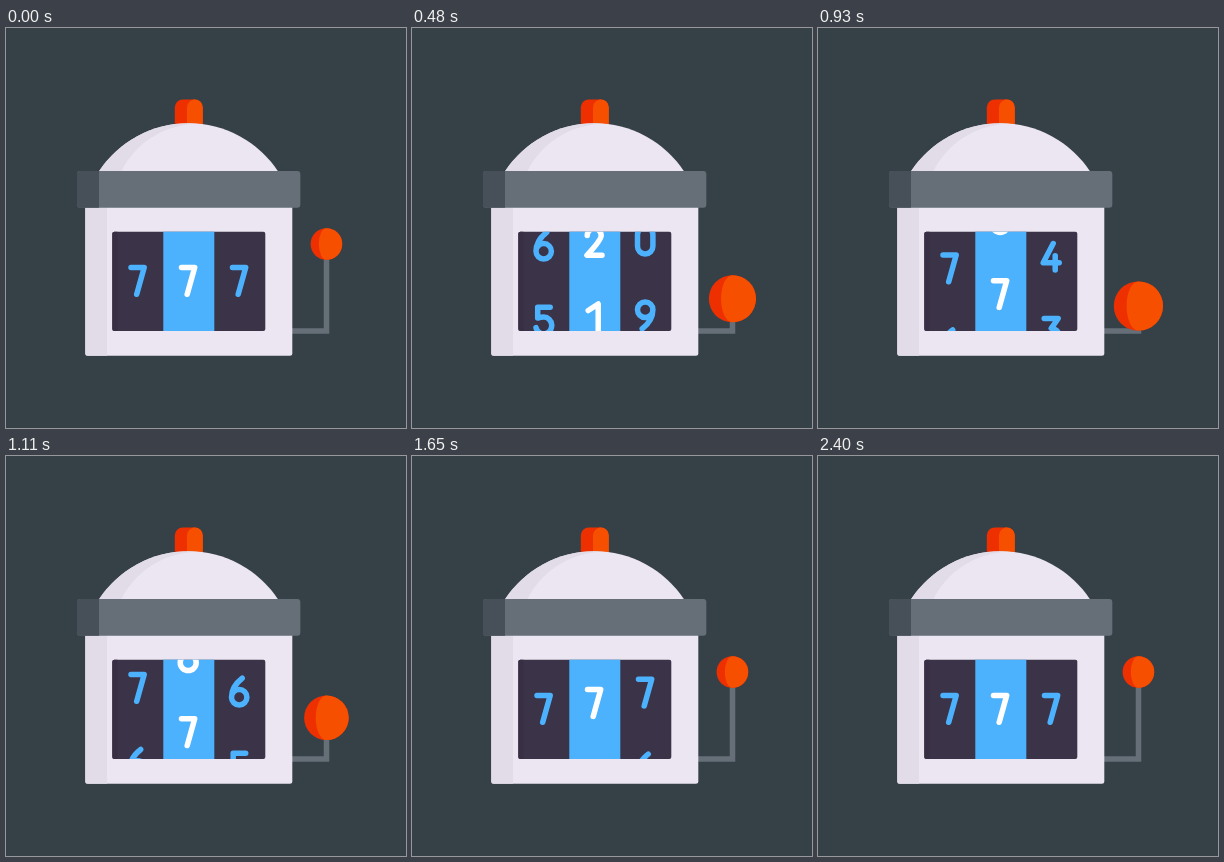
Animation of 400 by 400 pixels, one loop 4430 ms. Source, as an HTML page:

```html
<!DOCTYPE html>
<html lang="en">
<head>
<meta charset="utf-8">
<title>Slot machine</title>
<style>
  html, body { margin: 0; width: 100%; height: 100%; overflow: hidden; background: #364147; }
  svg { display: block; width: 100%; height: 100%; }
  .digits { fill: none; stroke-width: 5.5; stroke-linecap: round; stroke-linejoin: round; }
</style>
</head>
<body>
<svg viewBox="0 0 400 400">
  <defs>
    <clipPath id="window"><rect x="106.3" y="203.7" width="153" height="99.3" rx="2"/></clipPath>
    <clipPath id="band"><rect x="71" y="143" width="223.3" height="36.7" rx="3"/></clipPath>
    <clipPath id="body"><rect x="79.3" y="170" width="207" height="157.7" rx="2.5"/></clipPath>
    <clipPath id="dome"><path d="M92.5 144A107.4 107.4 0 0 1 272.5 144Z"/></clipPath>
  </defs>

  <path id="rod" fill="none" stroke="#666f78" stroke-width="5.5"/>
  <g id="ball">
    <circle r="1" fill="#ee3000"/>
    <path d="M0-1A1 1 0 0 1 0 1A.48 1 0 0 1 0-1Z" fill="#f74f00"/>
  </g>

  <path d="M168.8 97V79.5a8 8 0 0 1 8-8h12a8 8 0 0 1 8 8V97Z" fill="#ee3000"/>
  <path d="M181 97V80a8.5 8.5 0 0 1 6.500-8.500h1.300a8 8 0 0 1 8 8V97Z" fill="#f74f00"/>

  <g clip-path="url(#dome)">
    <rect x="90" y="90" width="185" height="56" fill="#ebe6f1"/>
    <path d="M90 146V90H192V95.500C158 97 130 114 115 144Z" fill="#e1dce7"/>
  </g>
  <g clip-path="url(#body)">
    <rect x="79" y="170" width="208" height="158" fill="#ebe6f1"/>
    <rect x="79" y="170" width="22" height="158" fill="#e1dce7"/>
  </g>
  <g clip-path="url(#band)">
    <rect x="71" y="143" width="224" height="37" fill="#666f78"/>
    <rect x="71" y="143" width="22" height="37" fill="#474f58"/>
  </g>

  <g clip-path="url(#window)">
    <rect x="106" y="203" width="154" height="101" fill="#3b3348"/>
    <rect x="106" y="203" width="5.500" height="101" fill="#382f44"/>
    <rect x="157.300" y="203" width="51" height="101" fill="#4db2fe"/>
    <g id="reels" class="digits"></g>
  </g>
</svg>
<script>
const LOOP = 4430, STEP = 30, REST = 2400;
const MID_Y = 252.8, GAP = 75;

const glyphs = [
  'M-7.7-5.8a7.7 7.7 0 0 1 15.4 0v11.6a7.7 7.7 0 0 1-15.4 0Z',
  'M-6-6.500L4-13V13.500',
  'M-7-6.500a7 7 0 0 1 14 0Q7-2-7.3 13.300H7.800',
  'M-7-13.300H7L0-3.500a8 8.400 0 1 1-7.700 10.500',
  'M2-13.300L-8 6H8M4-1V13.300',
  'M6.500-13.300H-6V-2.500Q-3-3.500 0-3.500a8 8.400 0 1 1-7.700 10.500',
  'M3-13.300Q-7.700-5-7.700 5.700a7.700 7.700 0 1 0 15.400 0a7.700 7.700 0 1 0-15.400 0',
  'M-6.700-13.300H6.500L-1 13.500',
  'M-6.200-7.300a6.200 6.200 0 1 1 12.400 0a6.200 6.200 0 1 1-12.400 0ZM-8 5.500a8 8 0 1 1 16 0a8 8 0 1 1-16 0Z',
  'M-3 13.300Q7.700 5 7.700-5.700a7.700 7.700 0 1 0-15.400 0a7.700 7.700 0 1 0 15.400 0'
];

// Each reel: centre x, colour, and [ms, digits turned] with overshoot and settle.
const reels = [
  { x: 131.7, color: '#4db2fe',
    keys: [[0, 0], [240, 2.71], [625, 10.42], [750, 10.25], [1040, 9.7], [1110, 9.72], [1430, 10]] },
  { x: 182.2, color: '#fff',
    keys: [[0, 0], [240, 1.52], [750, 8], [990, 10.42], [1110, 10.31], [1400, 9.71], [1780, 10]] },
  { x: 233.2, color: '#4db2fe',
    keys: [[0, 0], [240, .87], [750, 4.64], [1110, 8.77], [1350, 10.42], [1730, 9.7], [1950, 9.93], [2150, 10]] }
];

const byId = id => document.getElementById(id);
const smooth = (t, a, b) => {
  const s = Math.min(1, Math.max(0, (t - a) / (b - a)));
  return s * s * (3 - 2 * s);
};

// Slope at a key: flat at ends and turning points.
function slope(keys, i) {
  const p = keys[i - 1], k = keys[i], n = keys[i + 1];
  if (!p || !n || (k[1] - p[1]) * (n[1] - k[1]) <= 0) return 0;
  return (n[1] - p[1]) / (n[0] - p[0]);
}

function curve(keys, t) {
  const i = keys.findIndex(k => k[0] > t) - 1;
  if (i < 0) return keys[keys.length - 1][1];
  const [t0, v0] = keys[i], [t1, v1] = keys[i + 1];
  const d = t1 - t0, s = (t - t0) / d, r = 1 - s;
  return r * r * ((1 + 2 * s) * v0 + s * d * slope(keys, i)) +
         s * s * ((1 + 2 * r) * v1 - r * d * slope(keys, i + 1));
}

for (const reel of reels) {
  reel.marks = [0, 1, 2].map(() => {
    const mark = document.createElementNS('http://www.w3.org/2000/svg', 'path');
    mark.setAttribute('stroke', reel.color);
    return byId('reels').appendChild(mark);
  });
}

function draw(t) {
  for (const reel of reels) {
    const value = 7 + curve(reel.keys, t), near = Math.round(value);
    reel.marks.forEach((mark, i) => {
      const n = near + i - 1;
      mark.setAttribute('d', glyphs[n % 10]);
      mark.setAttribute('transform', `translate(${reel.x} ${MID_Y - (n - value) * GAP})`);
    });
  }
  const pull = smooth(t, 0, 610) - smooth(t, 948, 1432);
  const y = 216 + 62 * pull;
  byId('rod').setAttribute('d', `M284 303H320.500V${y}`);
  byId('ball').setAttribute('transform', `translate(320.400 ${y}) scale(${15.8 + 8.8 * pull})`);
}

const start = performance.now();
function tick() {
  const t = (performance.now() - start) % LOOP;
  draw(Math.min(REST, Math.floor(t / STEP) * STEP));
  requestAnimationFrame(tick);
}
tick();
</script>
</body>
</html>
```
